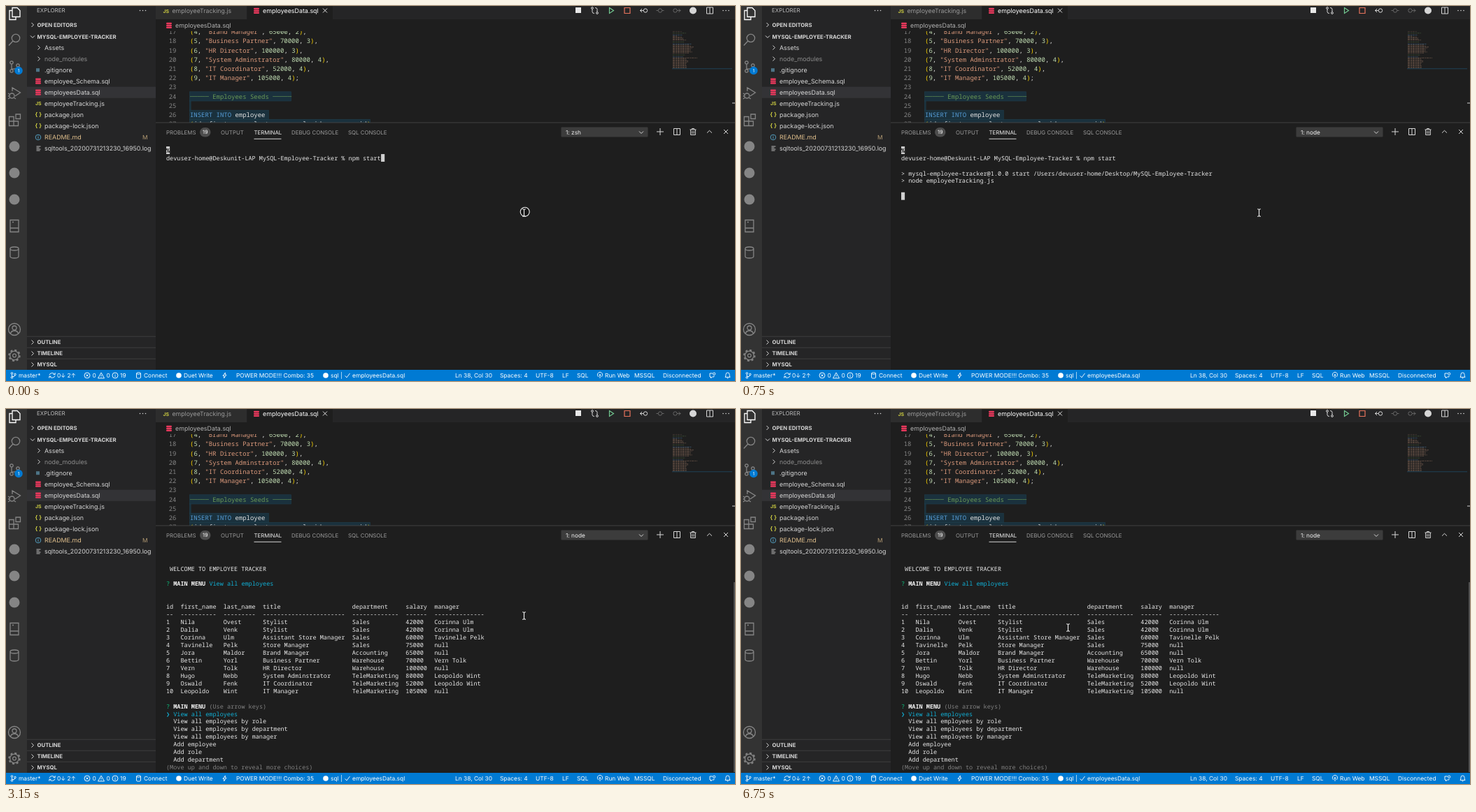
An HTML page for the animation above (8000 ms loop, 1042 px wide and 537 px high).

```html
<!DOCTYPE html>
<html lang="en">
<head>
<title>Employee tracker terminal</title>
<style>
html, body { margin: 0; width: 100%; height: 100%; overflow: hidden; background: #1e1e1e; }
svg { display: block; width: 100vw; height: 100vh; }
text { white-space: pre; font-family: Inter, sans-serif; text-rendering: geometricPrecision; }
.mono { font-family: "Noto Sans Mono", "DejaVu Sans Mono", monospace; }
</style>
</head>
<body>
<svg id="stage" viewBox="0 0 1042 537" preserveAspectRatio="none"></svg>
<script>
const stage = document.getElementById('stage');
const LOOP = 8000;
const GREY = '#858585', TEXT = '#d6d6d6', OUTPUT = '#e8e8e8', HINT = '#808080';
const RED = '#e8385c', YELLOW = '#cbcb41', CYAN = '#11b0d6';
const scenes = [];
let layer = stage;

function el(tag, attrs, content) {
  const node = document.createElementNS('http://www.w3.org/2000/svg', tag);
  for (const key in attrs) node.setAttribute(key, attrs[key]);
  if (content !== undefined) node.textContent = content;
  layer.appendChild(node);
  return node;
}
const rect = (x, y, width, height, fill, more) => el('rect', { x, y, width, height, fill, ...more });
const disc = (cx, cy, r, fill) => el('circle', { cx, cy, r, fill });
const label = (x, cy, str, size = 8.85, fill = TEXT, more) =>
  el('text', { x, y: cy + size * 0.36, 'font-size': size, fill, ...more }, str);
const icon = (x, y, d, stroke = TEXT, width = 1, fill = 'none') =>
  el('path', { d, stroke, fill, 'stroke-width': width, transform: `translate(${x} ${y})` });
const ring = (x, y, r) => `M${x - r},${y}a${r},${r} 0 1 0 ${2 * r},0a${r},${r} 0 1 0 ${-2 * r},0`;

// Visible only while from <= time < to
function scene(from, to, draw) {
  const outer = layer;
  const node = layer = el('g');
  draw();
  layer = outer;
  scenes.push({ node, from, to });
}

const CHEVRON = {
  right: 'M-1.5,-3L1.5,0L-1.5,3', down: 'M-3,-1.5L0,1.5L3,-1.5', up: 'M-3.5,1.7L0,-1.7L3.5,1.7'
};
const CROSS = 'M-3,-3L3,3M3,-3L-3,3';
const SPLIT = 'M-4.5,-4.5h9v9h-9zM0,-4.5v9';
const CYLINDER = 'M-6,-5.5a6,2.5 0 0 1 12,0v11a6,2.5 0 0 1 -12,0zM-6,-5.5a6,2.5 0 0 0 12,0';
const BRANCH = ring(-2, -3, 1.3) + ring(-2, 3, 1.3) + ring(2.5, -1.5, 1.3) + 'M-2,-1.7v3.4M2.5,-.2q0,2 -4.5,2';

function database(x, y) {
  for (const dy of [-4.2, -1.3, 1.6]) rect(x - 4, y + dy, 8, 2.4, RED, { rx: 1.1 });
}
function dots(x, y) {
  for (const dx of [-4, 0, 4]) disc(x + dx, y, 0.8, TEXT);
}

function drawEditor() {
  const charW = 5.375, left = 263, lineY = n => 50.2 + (n - 18) * 13.2;
  const select = (n, chars) => rect(left - 0.5, lineY(n) - 6.6, chars * charW, 13.2, '#1a313d',
    { stroke: '#1f3f4e', 'stroke-width': 0.6 });
  select(24, 27); select(25, 0.3); select(26, 21); select(27, 48);

  const jobs = ['Brand Manager", 65000, 2', 'Business Partner", 70000, 3', 'HR Director", 100000, 3',
    'System Adminstrator", 80000, 4', 'IT Coordinator", 52000, 4', 'IT Manager", 105000, 4'];
  const lines = jobs.map((job, i) => `(${i + 4}, "${job})${i < 5 ? ',' : ';'}`);
  const rule = '\u2500'.repeat(5);
  lines.push('', `${rule} Employees Seeds ${rule}`, '', 'INSERT INTO employee',
    '(id, first_name, last_name, role_id, manager_id)');

  const tint = token => /^"/.test(token) ? '#dc9a7c' : /^\d/.test(token) ? '#c0dcb2'
    : /^[()]/.test(token) ? '#ffd700' : /^INSERT/.test(token) ? '#569cd6'
    : /^\u2500/.test(token) ? '#6a9955' : '#e2e2e2';
  lines.forEach((line, i) => {
    const n = 17 + i;
    label(243.5, lineY(n), n, 8.96, GREY, { class: 'mono', 'text-anchor': 'end' });
    for (const m of line.matchAll(/"[^"]*"|\d+|[()]|INSERT INTO|\u2500.*|[^"\d()]+/g))
      label(left + m.index * charW, lineY(n), m[0], 8.96, tint(m[0]), { class: 'mono' });
  });

  // Minimap: one thin run per code line
  const widths = [13, 0, 19, 0, 14, 6, 13, 15, 15, 19, 0, 16, 0, 27, 23, 26, 30, 28, 25, 26, 25, 28, 23,
    0, 18, 0, 15, 35, 19, 20, 22, 22, 20, 19, 19, 20, 20, 20];
  widths.forEach((w, i) => {
    const fill = [2, 11, 24].includes(i) ? '#43593b' : [4, 13, 26].includes(i) ? '#3f6485' : '#765c4f';
    el('path', { d: `M953,${36 + i * 1.42}h${w}`, stroke: fill, 'stroke-width': 0.7, 'stroke-dasharray': '3 1 2 .8' });
  });
  rect(952, 89.3, 86, 1, '#1f4258');
  rect(1038, 138, 4, 2, '#777777');
}

function drawTabs() {
  rect(214, 0, 828, 19, '#252526');
  rect(214, 0, 130, 19, '#2d2d2d');
  rect(344.5, 0, 122.5, 19, '#1e1e1e');
  rect(214, 19, 828, 17, '#1e1e1e');
  label(224.5, 7, 'JS', 7, YELLOW, { 'font-weight': 700 });
  label(237.5, 7, 'employeeTracking.js', 8.75, '#9a9a9a');
  database(358, 7);
  label(367, 7, 'employeesData.sql', 8.9, '#ffffff');
  icon(456, 6.5, CROSS, '#dddddd');
  database(233, 28);
  label(242, 28, 'employeesData.sql', 8.9, '#b2b2b2');

  rect(814, 2, 8, 8, '#e8e8e8');
  icon(841.5, 6.5, ring(-3.5, -3.5, 1.4) + ring(3.5, 3.5, 1.4) + 'M-3.5,-2v4q0,2 3,2M3.5,2v-4q0,-2 -3,-2');
  icon(865, 6.5, 'M-2.5,-4L3.5,0L-2.5,4z', '#73c991', 1.2);
  icon(888, 6.5, 'M-4,-4h8v8h-8z', '#e8745c', 1.2);
  icon(912, 6.5, ring(2, 0, 2.7) + 'M-.7,0h-5M-3,-2.5L-5.5,0L-3,2.5');
  icon(935, 6.5, ring(0, 0, 2.7) + 'M-5.5,0h2.8M2.7,0h2.8', '#666666');
  icon(958.5, 6.5, ring(-2, 0, 2.7) + 'M.7,0h5M3,-2.5L5.5,0L3,2.5', '#666666');
  disc(982, 6.5, 5, TEXT);
  icon(1006, 6.5, SPLIT);
  dots(1029, 6.5);
}

function drawSidebar() {
  rect(30, 0, 184, 521, '#252526');
  rect(30, 115.7, 184, 16.1, '#333336');
  label(44, 6.5, 'EXPLORER', 7.95, '#bbbbbb');
  dots(195.5, 6.5);
  const bold = { 'font-weight': 700 };
  const section = (y, title, open) => {
    icon(38, y, open ? CHEVRON.down : CHEVRON.right);
    label(44.5, y, title, 7.75, TEXT, bold);
  };
  section(27, 'OPEN EDITORS');
  section(44, 'MYSQL-EMPLOYEE-TRACKER', true);
  [['OUTLINE', 481.5], ['TIMELINE', 497.5], ['MYSQL', 513.5]].forEach(([title, y]) => {
    rect(30, y - 8.7, 184, 0.8, '#434344');
    section(y, title);
  });

  const marks = {
    folder: y => icon(47, y, CHEVRON.right),
    git: y => rect(43, y - 2.5, 5, 5, '#4d7486'),
    db: y => database(46, y),
    js: y => label(42, y, 'JS', 7, YELLOW, bold),
    json: y => label(41.5, y - 0.5, '{ }', 8, YELLOW, bold),
    info: y => icon(46, y, ring(0, 0, 3.8) + 'M0,-.8v3M0,-2.4v1', '#519aba'),
    log: y => icon(46.5, y, 'M-3,-3h6M-3,-1h4M-3,1h6M-3,3h5', '#b5b5b5')
  };
  const files = [['folder', 'Assets'], ['folder', 'node_modules', '#8c8c8c'], ['git', '.gitignore'],
    ['db', 'employee_Schema.sql'], ['db', 'employeesData.sql'], ['js', 'employeeTracking.js'],
    ['json', 'package.json'], ['json', 'package-lock.json'], ['info', 'README.md', '#e2c08d'],
    ['log', 'sqltools_20200731213230_16950.log']];
  files.forEach(([kind, name, color], i) => {
    const y = 59.6 + i * 16.05;
    marks[kind](y);
    label(55, y, name, 8.9, color);
  });
  label(195, 188, 'M', 8.4, '#b39a72');
}

function drawActivityBar() {
  rect(0, 0, 30, 521, '#333333');
  const item = (y, d, color = GREY) => icon(12, y, d, color, 1.3);
  item(10.5, 'M-3,-8h7l4,4v9h-11zM-3,-4h-4v13h9v-4', '#ffffff');
  item(48, ring(2, -2, 5.7) + 'M-2.2,2.2L-8,8.5');
  item(87, ring(-4, -6, 2.2) + ring(-4, 6, 2.2) + ring(5, -2, 2.2) + 'M-4,-3.8v7.6M5,.2q0,3 -9,3');
  disc(18, 92.5, 5.8, '#007ad3');
  label(18, 92.5, '1', 6.5, '#ffffff', { 'text-anchor': 'middle' });
  item(125, 'M-3,-3v-5L8.5,-1L1,4' + ring(-3.5, 3.5, 3.5) + 'M-9,0l3,2M-9,4h2M-9,8l3,-2M2,8l-3,-2');
  item(163, 'M-7.5,-4.5h6.5v13h-6.5zM-7.5,2h13v6.5h-13M2,-8h6.5v6.5h-6.5z');
  [201, 239, 277].forEach(y => disc(12, y, 7.5, GREY));
  item(315, 'M-6,-8.5h12v17h-12zM-6,3h12M-3,-5.5h2');
  item(353, CYLINDER);
  item(463, ring(0, 0, 8.5) + ring(0, -2, 3) + 'M-5.5,6q1,-4 5.5,-4t5.5,4');
  item(500.5, ring(0, 0, 2.4) + ring(0, 0, 6.3));
  el('circle', { cx: 12, cy: 500.5, r: 7.7, fill: 'none', stroke: GREY, 'stroke-width': 2, 'stroke-dasharray': 3.024 });
}

function drawStatusBar() {
  const white = '#ffffff', y = 529;
  rect(0, 521, 1042, 16, '#007ad3');
  const entries = [[18, 'master*'], [73, '0\u2193 2\u2191'], [123.5, '0'], [143.5, '0'], [163, '19'],
    [197, 'Connect'], [254, 'Duet Write'], [329, 'POWER MODE!!! Combo: 35'], [464, 'sql |'],
    [495, 'employeesData.sql'], [642, 'Ln 38, Col 30'], [706, 'Spaces: 4'], [757, 'UTF-8'], [795, 'LF'],
    [816, 'SQL'], [856, 'Run Web'], [898, 'MSSQL'], [939, 'Disconnected']];
  entries.forEach(([x, str]) => label(x, y, str, 8.4, white));
  const mark = (x, d) => icon(x, y, d, white, 0.9);
  mark(10.5, BRANCH);
  mark(66, 'M-4,-.5a4,3.5 0 0 1 7.5,-1M4,.5a4,3.5 0 0 1 -7.5,1M1.5,-1.3h2.7v-2.5M-1.5,1.3h-2.7v2.5');
  mark(116, ring(0, 0, 4) + 'M-1.6,-1.6L1.6,1.6M1.6,-1.6L-1.6,1.6');
  mark(136, 'M0,-4L4.5,4h-9zM0,-1v2.4M0,2.4v.8');
  mark(156, ring(0, 0, 4) + 'M0,-.5v2.8M0,-2.2v.9');
  mark(189.5, 'M-3,-3a3,1.2 0 0 1 6,0v6a3,1.2 0 0 1 -6,0zM-3,-3a3,1.2 0 0 0 6,0');
  disc(247, y, 3.8, white);
  mark(312.5, 'M1,-4L-2.5,.5h2L-1,4L2.5,-.8h-2z');
  disc(457, y, 3.8, white);
  mark(488, 'M-3.5,.5L-1,3L3.5,-3');
  mark(849, ring(0, -0.5, 1) + 'M0,.5v3.5M-2,2a3.6,3.6 0 1 1 4,0');
  mark(1010, 'M-4,-3h4M-4,-3v5h1.5v2l2,-2h2.5v-1.5' + ring(2.2, -2.3, 1.6));
  mark(1031.5, 'M-3.5,2.5q1,-1 1,-4a2.5,2.5 0 0 1 5,0q0,3 1,4zM-1,4h2');
}

function drawPanel() {
  rect(214, 167, 828, 354, '#1e1e1e');
  rect(214, 166.6, 828, 0.8, '#4a4a4a');
  [[229, 'PROBLEMS'], [307, 'OUTPUT'], [354.5, 'TERMINAL', '#f0f0f0'], [408, 'DEBUG CONSOLE'], [489, 'SQL CONSOLE']]
    .forEach(([x, str, color = '#9c9c9c']) => label(x, 181, str, 7.85, color));
  rect(277, 174, 15.5, 13.5, '#4d4d4d', { rx: 6.75 });
  label(284.8, 180.7, '19', 7.4, '#ffffff', { 'text-anchor': 'middle' });
  rect(354.5, 189.8, 39, 0.9, '#e7e7e7');
  rect(793.5, 173.5, 124, 14, '#3c3c3c', { rx: 1 });
  scene(0, 600, () => label(800, 181, '1: zsh', 8.3, '#f0f0f0'));
  scene(600, LOOP, () => label(800, 181, '1: node', 8.3, '#f0f0f0'));
  icon(908, 181, CHEVRON.down);
  icon(935, 180, 'M-5,0h10M0,-5v10');
  icon(959, 180, SPLIT);
  icon(982, 180, 'M-4.5,-3h9M-1.5,-3v-1.5h3v1.5M-3.4,-3v7.5h6.8v-7.5M-1.2,-1v4M1.2,-1v4');
  icon(1005.5, 180, CHEVRON.up);
  icon(1029, 180, CROSS);
}

const CELL = 5.118, ROW = 10.945;
const colX = col => 229 + col * CELL, rowY = row => 206.6 + row * ROW;
const put = (row, col, str, fill = OUTPUT, weight = 400) =>
  label(colX(col), rowY(row), str, 8.53, fill, { class: 'mono', 'font-weight': weight });
const block = (row, col) => rect(colX(col), rowY(row) - 5.5, CELL, ROW, '#d0d0d0');

function question(row, answer, color) {
  put(row, 0, '?', '#0dbc79');
  put(row, 2, 'MAIN MENU', '#f2f2f2', 700);
  put(row, 12, answer, color);
}
function menu(row) {
  question(row, '(Use arrow keys)', HINT);
  put(row + 1, 0, '\u276f', CYAN);
  ['View all employees', 'View all employees by role', 'View all employees by department',
    'View all employees by manager', 'Add employee', 'Add role', 'Add department']
    .forEach((choice, i) => put(row + 1 + i, 2, choice, i ? OUTPUT : CYAN));
  put(row + 8, 0, '(Move up and down to reveal more choices)', HINT);
}
function table(row) {
  const widths = [2, 10, 9, 23, 13, 6, 14];
  const records = `Nila|Ovest|Stylist|Sales|42000|Corinna Ulm
Dalia|Venk|Stylist|Sales|42000|Corinna Ulm
Corinna|Ulm|Assistant Store Manager|Sales|60000|Tavinelle Pelk
Tavinelle|Pelk|Store Manager|Sales|75000|null
Jora|Maldor|Brand Manager|Accounting|65000|null
Bettin|Yorl|Business Partner|Warehouse|70000|Vern Tolk
Vern|Tolk|HR Director|Warehouse|100000|null
Hugo|Nebb|System Adminstrator|TeleMarketing|80000|Leopoldo Wint
Oswald|Fenk|IT Coordinator|TeleMarketing|52000|Leopoldo Wint
Leopoldo|Wint|IT Manager|TeleMarketing|105000|null`.split('\n').map((r, i) => [`${i + 1}`, ...r.split('|')]);
  const header = 'id|first_name|last_name|title|department|salary|manager'.split('|');
  [header, widths.map(w => '-'.repeat(w)), ...records].forEach((cells, i) =>
    put(row + i, 0, cells.map((cell, c) => cell.padEnd(widths[c])).join('  ')));
}

function drawTerminal() {
  const user = 'devuser-home', title = ' WELCOME TO EMPLOYEE TRACKER';
  scene(0, 3150, () => {
    block(0, 0);
    put(0, 0, '%', '#1e1e1e', 700);
    put(1, 0, `${user}@Deskunit-LAP MySQL-Employee-Tracker % npm start`);
  });
  scene(0, 450, () => block(1, 60));
  scene(450, 750, () => block(2, 0));
  scene(750, 1200, () => block(6, 0));
  scene(750, 3150, () => {
    put(3, 0, `> mysql-employee-tracker@1.0.0 start /Users/${user}/Desktop/MySQL-Employee-Tracker`);
    put(4, 0, '> node employeeTracking.js');
  });
  scene(1200, 3150, () => { put(7, 0, title); menu(9); });
  scene(3150, LOOP, () => {
    put(2, 0, title);
    question(4, 'View all employees', CYAN);
    table(7);
    menu(20);
    rect(1040, 248, 2, 272, '#4f4f4f');
  });
}

// [start time, x, y]
const pointerStops = [[0, 740.5, 296], [5400, 727, 303], [5550, 698, 302], [5700, 488, 297],
  [5850, 475, 302], [6600, 467.5, 312.3], [6750, 467.5, 313]];

drawEditor();
drawTabs();
drawSidebar();
drawActivityBar();
drawPanel();
drawTerminal();
drawStatusBar();
scene(0, 150, () => el('circle', { cx: 741.7, cy: 294.8, r: 6.5, fill: '#151515', stroke: '#f0f0f0', 'stroke-width': 1.1 }));
const pointer = icon(0, 0, 'M-2.4,-5.2q2.4,0 2.4,1.2q0,-1.2 2.4,-1.2M0,-4v8M-2.4,5.2q2.4,0 2.4,-1.2q0,1.2 2.4,1.2', '#f4f4f4', 1.1);

function frame() {
  const time = performance.now() % LOOP;
  for (const { node, from, to } of scenes)
    node.style.display = time >= from && time < to ? '' : 'none';
  const [, x, y] = pointerStops.findLast(stop => time >= stop[0]);
  pointer.setAttribute('transform', `translate(${x} ${y})`);
  requestAnimationFrame(frame);
}
frame();
</script>
</body>
</html>
```
